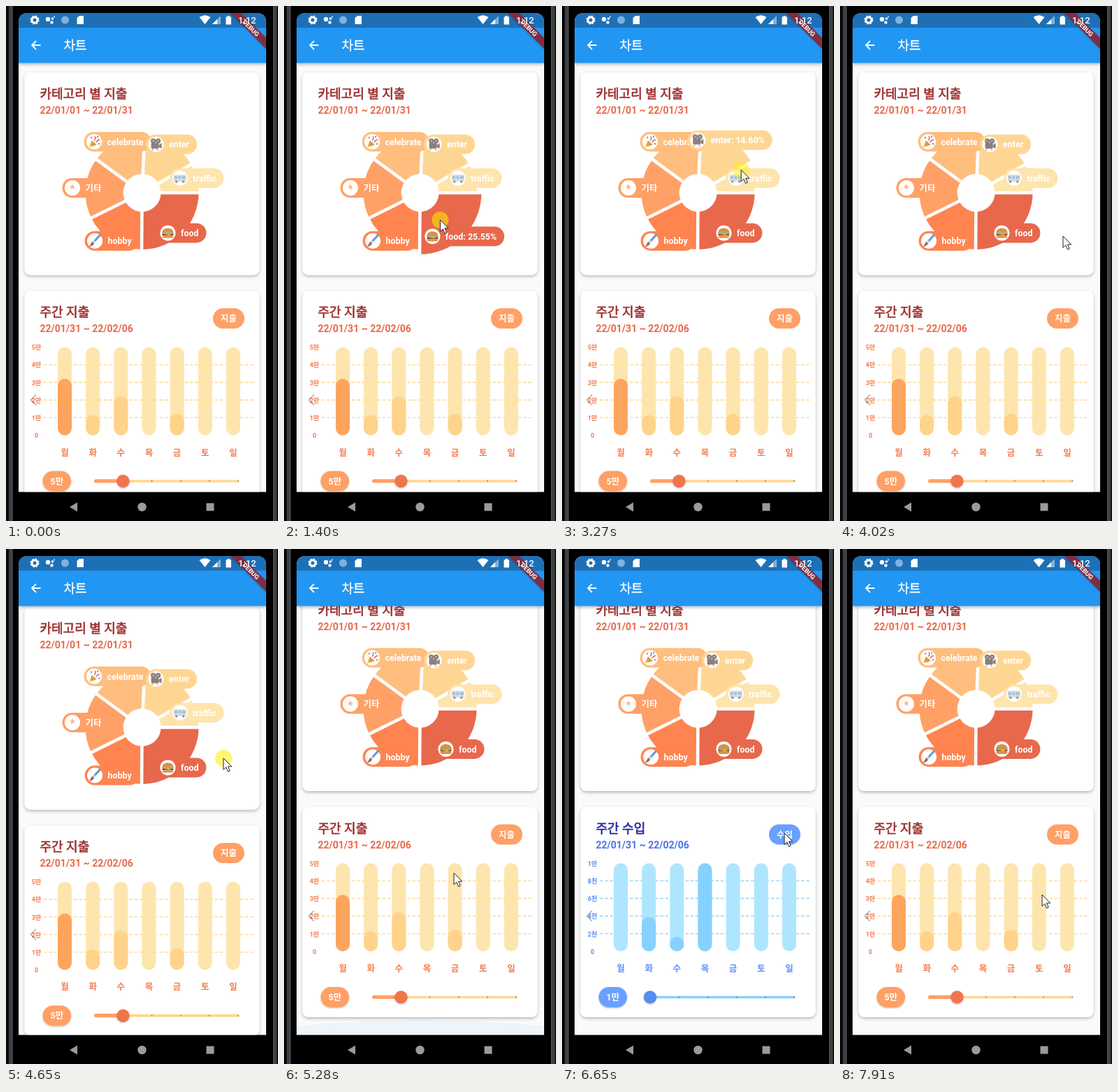
These frames come from a looping animation (389x736 px, 8 s). An HTML page:

```html
<!DOCTYPE html>
<html lang="ko">
<head>
<meta charset="utf-8">
<style>
  html, body { margin: 0; width: 100%; height: 100%; overflow: hidden; background: #000; }
  svg { display: block; width: 389px; height: 736px; }
  text { font-family: Roboto, "Noto Sans CJK KR", "Noto Sans CJK JP", sans-serif; }
  .bold { font-weight: 700; }
  .title { font-size: 18px; fill: currentColor; stroke: currentColor; stroke-width: .7px; }
  .date { font-size: 14px; font-weight: 700; }
  .label { font-size: 12.4px; font-weight: 700; fill: #fff; }
  .axis { font-size: 9px; font-weight: 700; }
  .day { font-size: 12.5px; font-weight: 700; }
  .mid { text-anchor: middle; }
</style>
</head>
<body>
<svg id="stage" viewBox="0 0 389 736" xmlns="http://www.w3.org/2000/svg"></svg>
<script>
const LOOP = 8000;
const CX = 194.6, CY = 267, RADIUS = 81, GROW = 7;
const BAR_TOP = 487.5, BAR_H = 126, BAR_X = 84, BAR_STEP = 40.15;

const slices = [
  { name: 'food', share: '25.55%', from: 0, to: 90.4, color: '#e8684c', icon: 'burger' },
  { name: 'hobby', share: '17.52%', from: 90.4, to: 153.7, color: '#ff8450', icon: 'brush' },
  { name: '기타', share: '18.25%', from: 153.7, to: 216.2, color: '#ffa067', icon: 'star' },
  { name: 'celebrate', share: '15.33%', from: 216.2, to: 272.5, color: '#ffbe7d', icon: 'party' },
  { name: 'enter', share: '14.60%', from: 272.5, to: 330, color: '#fed694', icon: 'camera' },
  { name: 'traffic', share: '8.76%', from: 330, to: 360, color: '#fee4ad', icon: 'bus' },
];

const themes = {
  expense: {
    word: '지출', title: '#9e2f2f', date: '#e8694b', axis: '#f47b4c', pill: '#ffa066',
    grid: '#ffdc9c', track: '#ffd88e', thumb: '#f0744c', thumbX: 167.4, limit: '5만',
    ticks: ['5만', '4만', '3만', '2만', '1만', '0'],
    back: [253, 229, 173], fills: [[255, 164, 92], [255, 211, 138]],
    values: [.64, .23, .445, 0, .245, 0, 0],
  },
  income: {
    word: '수입', title: '#2a2a9e', date: '#4a75e8', axis: '#5c8df6', pill: '#69a0ff',
    grid: '#9fd8f5', track: '#87d2ff', thumb: '#538df0', thumbX: 126, limit: '1만',
    ticks: ['1만', '8천', '6천', '4천', '2천', '0'],
    back: [174, 230, 255], fills: [[134, 209, 255], [134, 209, 255]],
    values: [0, .39, .165, 1, 0, 0, 0],
  },
};

// Timeline
const touches = [[1255, 0], [1700, 1], [2130, 2], [2560, 3], [3010, 4], [3330, -1]];
const toIncome = 6270, toExpense = 7520, barTime = 380;
const cursorKeys = [
  [510, 374, 722], [640, 352, 610], [760, 300, 440], [1010, 230, 298], [1280, 230, 298],
  [1500, 218, 312], [1750, 175, 316], [2000, 150, 295], [2260, 146, 266], [2400, 146, 262],
  [2650, 165, 224], [2900, 190, 216], [3020, 208, 215], [3270, 256, 234], [3650, 322, 330],
  [3900, 322, 330], [4300, 312, 326], [4520, 311, 312], [4650, 311, 299], [5030, 309, 262],
  [5280, 243, 463], [5560, 243, 463], [5950, 318, 406], [7560, 318, 406], [7900, 289, 494],
];
const scrollKeys = [[4300, 0], [4520, 4], [4650, 12], [4900, 33], [5030, 38.5]];
const glowKeys = [[4950, 0], [5120, 1], [5280, .9], [5530, 0]];
const pressKeys = [
  [1230, 0], [1255, 1], [3200, 1], [3270, .8], [3450, 0], [4280, 0], [4300, 1], [5030, 1],
  [5150, 0], [6180, 0], [6200, 1], [6280, 1], [6420, 0], [7490, 0], [7510, 1], [7560, 1], [7680, 0],
];

const clamp = v => Math.max(0, Math.min(1, v));
const mix = (a, b, p) => a + (b - a) * p;
const rgb = (a, b, p) => `rgb(${a.map((v, i) => Math.round(mix(v, b[i], p)))})`;
const polar = (r, deg) => {
  const a = deg * Math.PI / 180;
  return [CX + r * Math.cos(a), CY + r * Math.sin(a)];
};

function track(keys, t) {
  const next = keys.findIndex(k => k[0] > t);
  if (next === 0) return keys[0].slice(1);
  if (next < 0) return keys[keys.length - 1].slice(1);
  const a = keys[next - 1], b = keys[next];
  const p = (t - a[0]) / (b[0] - a[0]);
  return a.slice(1).map((v, i) => mix(v, b[i + 1], p));
}

const icons = {
  burger: `<path d="M-8-1C-8-9 8-9 8-1Z" fill="#d98f4a"/><rect x="-8.5" y="-1" width="17" height="2" rx="1" fill="#9aa85a"/>
    <rect x="-8" y="1" width="16" height="2.6" rx="1" fill="#8a4a3a"/><path d="M-7 1L6 1L2 3Z" fill="#f6c343"/>
    <path d="M-8 4H8Q8 7 5 7H-5Q-8 7-8 4Z" fill="#d98f4a"/>`,
  brush: `<path d="M7-8L-2 2" stroke="#5f9bd0" stroke-width="3" stroke-linecap="round"/>
    <path d="M0 0L-3 3" stroke="#d2d6d9" stroke-width="4"/><path d="M-4 1L-1 4Q-4 8-8 8Q-6 5-4 1Z" fill="#94695a"/>`,
  star: `<text class="mid" y="7" font-size="17" fill="#ffa067">*</text>`,
  party: `<path d="M-7 8L-3-2L4 4Z" fill="#f0b43c"/><path d="M-5 3L0 6M-4 0L2 5" stroke="#c66d3b"/>
    <path d="M0-2Q3-4 1-8M3 1Q5-3 8-3" fill="none" stroke="#d85b64" stroke-width="1.4"/>
    <g fill="#58a5d8"><circle cx="-4" cy="-6" r="1.2"/><circle cx="5" cy="-7" r="1.2"/><circle cx="7" cy="3" r="1.2"/></g>`,
  camera: `<g fill="#8c7e7a"><circle cx="-4" cy="-5" r="3.6"/><circle cx="3" cy="-5" r="3.6"/>
    <rect x="-7" y="-2" width="11" height="8" rx="1"/><path d="M4 1L8-2V6L4 4Z"/></g>
    <g fill="#b8aaa5"><circle cx="-4" cy="-5" r="1.4"/><circle cx="3" cy="-5" r="1.4"/></g><path d="M-4 6L-6 9M1 6L3 9" stroke="#8c7e7a"/>`,
  bus: `<rect x="-9" y="-5" width="18" height="10" rx="2" fill="#d9dee1"/><rect x="-8" y="-3" width="16" height="4" fill="#a6c3d3"/>
    <path d="M-3-3V1M2-3V1" stroke="#eef1f2"/><g fill="#8c9296"><circle cx="-5" cy="5" r="1.7"/><circle cx="5" cy="5" r="1.7"/></g>`,
};

const text = (x, y, s, attrs = '') => `<text x="${x}" y="${y}" ${attrs}>${s}</text>`;
const repeat = (n, fn) => Array.from({ length: n }, (_, i) => fn(i)).join('');
const card = (y, h) => `<rect x="26.5" y="${y}" width="336" height="${h}" rx="8.5" fill="#fff" filter="url(#shadow)"/>`;

const pieMarkup = `
  ${slices.map((s, i) => `<path id="slice${i}" fill="${s.color}"/>`).join('')}
  ${slices.map(s => {
    const [x, y] = polar(93, s.from);
    return `<path d="M${CX} ${CY}L${x} ${y}" stroke="#fff" stroke-width="4.6"/>`;
  }).join('')}
  <circle cx="${CX}" cy="${CY}" r="27" fill="#fff"/>
  ${slices.map((s, i) => `<g id="badge${i}"><rect y="-14" height="28" rx="14" fill="${s.color}"/>
    <circle cx="14.5" r="11" fill="#fff"/><g transform="translate(14.5)">${icons[s.icon]}</g>
    <text class="label" x="33" y="4.6"></text></g>`).join('')}`;

const days = ['월', '화', '수', '목', '금', '토', '일'];

const weekMarkup = `
  ${text(48.5, 444, '', 'id="weekTitle" class="title"')}
  ${text(48.5, 466, '22/01/31 ~ 22/02/06', 'class="date" data-fill="date"')}
  <rect x="296" y="432" width="45" height="29" rx="14.5" data-fill="pill"/>
  ${text(318.5, 451, '', 'id="toggle" class="label mid"')}
  ${repeat(6, i => text(43.5, 491.2 + i * 25.2, '', `id="tick${i}" class="axis mid" data-fill="axis"`))}
  <path id="grid" d="${repeat(4, i => `M54 ${BAR_TOP + (i + 1) * BAR_H / 5}H355`)}" stroke-width="1.6" stroke-dasharray="4.5 2.7"/>
  ${days.map((d, i) => {
    const x = BAR_X + i * BAR_STEP;
    return `<rect id="back${i}" x="${x - 10}" y="${BAR_TOP}" width="20" height="${BAR_H}" rx="10"/>
      <rect id="bar${i}" x="${x - 10}" width="20"/>
      ${text(x, 642.5, d, 'class="day mid" data-fill="axis"')}`;
  }).join('')}
  <path d="M43 555.5L35.5 563L43 570.5" fill="none" stroke="#000" stroke-opacity=".25" stroke-width="2"/>
  <rect x="52.5" y="664.5" width="40.5" height="29" rx="14.5" data-fill="pill" filter="url(#lift)"/>
  ${text(72.8, 683.5, '', 'id="limit" class="label mid"')}
  <rect x="126" y="677.2" width="207.5" height="3.6" rx="1.8" data-fill="track"/>
  <rect id="active" x="126" y="676.2" height="5.4" rx="2.7" data-fill="pill"/>
  ${repeat(5, i => `<circle cx="${167.4 + i * 41.2}" cy="679" r=".9" fill="#9b6a45"/>`)}
  <circle id="thumb" cy="679" r="9.2" data-fill="thumb" filter="url(#lift)"/>`;

const statusMarkup = `
  <g fill="#fff">
    <circle cx="41" cy="20" r="4" fill="none" stroke="#fff" stroke-width="3"/>
    <circle cx="41" cy="20" r="5.7" fill="none" stroke="#fff" stroke-width="1.6" stroke-dasharray="2.4 2.1"/>
    <circle cx="60" cy="19" r="3.2"/><circle cx="66.5" cy="18" r="1.8"/><circle cx="65.5" cy="23.5" r="2.2"/><circle cx="69" cy="15.5" r="1"/>
    <circle cx="84.5" cy="20" r="5.5" fill="#7fb2de"/><path d="M80 17a5 5 0 0 0 7 7a5 5 0 0 1-7-7" fill="#e4f1fb"/>
    <path d="M105 14h6v12h-9.500v-9z"/>
    <path d="M276.500 16Q284.500 10.500 292.500 16L284.500 26Z"/>
    <path d="M307 14V26H295Z" opacity=".45"/><path d="M302 19V26H295Z"/>
    <path d="M314.500 15.500h2v-1.500h3.500v1.500h2V26.500h-7.500z"/>
  </g>`;

const stage = document.getElementById('stage');
stage.innerHTML = `
  <defs>
    <filter id="shadow" x="-10%" y="-10%" width="120%" height="120%"><feDropShadow dx="0" dy="2" stdDeviation="2.2" flood-opacity=".28"/></filter>
    <filter id="lift" x="-30%" y="-30%" width="160%" height="160%"><feDropShadow dx="0" dy="1" stdDeviation="1" flood-opacity=".28"/></filter>
    <clipPath id="screen"><path d="M18 694.500V24Q18 10 32 10H358Q372 10 372 24V694.500Z"/></clipPath>
    <clipPath id="body"><rect x="18" y="81" width="354" height="613.5"/></clipPath>
  </defs>
  <rect width="389" height="736" fill="#08080a"/>
  <path d="M6.500 0V736M385 0V736" stroke="#3c3e43" stroke-width="5"/>
  <path d="M9 0V736M382.500 0V736" stroke="#5c5e64"/>
  <rect x="10" width="372" height="736" fill="#000"/>
  <g clip-path="url(#screen)">
    <rect x="18" y="10" width="354" height="685" fill="#fafafa"/>
    <g clip-path="url(#body)">
      <g id="page">
        ${card(95, 289.5)}
        ${text(48.5, 132, '카테고리 별 지출', 'class="title" color="#9e2f2f"')}
        ${text(48.5, 154, '22/01/01 ~ 22/01/31', 'class="date" fill="#e8694b"')}
        ${pieMarkup}
        ${card(407, 300.5)}
        ${weekMarkup}
      </g>
      <path id="glow" d="M18 695V682Q195 664 372 682V695Z" fill="#2196f3" fill-opacity=".06"/>
    </g>
    <rect x="18" y="10" width="354" height="71.500" fill="#2196f3" filter="url(#shadow)"/>
    <rect x="18" y="10" width="354" height="21" fill="#1d70b6"/>
    <path d="M49.500 56H37M43 50L37 56L43 62" fill="none" stroke="#fff" stroke-width="1.800"/>
    ${text(82.5, 62.5, '차트', 'font-size="18" fill="#fff" stroke="#fff" stroke-width=".3"')}
    <path d="M321 10H336.400L372 45.600V61Z" fill="#7f2f42" filter="url(#lift)"/>
    <text class="bold mid" font-size="9.2" fill="#fff" transform="translate(350.4 31.6) rotate(45)" y="3.2">DEBUG</text>
    ${statusMarkup}
    ${text(332, 24.8, '1:12', 'font-size="13" font-weight="500" fill="#fff"')}
  </g>
  <g fill="#9b9b9b"><path d="M91 716L102 709.500V722.500Z"/><circle cx="194.500" cy="716" r="6.200"/><rect x="286.500" y="710.500" width="11" height="11"/></g>
  <g id="cursor">
    <circle id="press" r="12" fill="#fff000" fill-opacity=".55"/>
    <path d="M0 0V16.500L3.800 13L6.500 19.300L9.200 18.100L6.500 12H11.700Z" fill="#fff" stroke="#222" stroke-width="1"/>
  </g>`;

const el = id => document.getElementById(id);
const set = (node, attrs) => { for (const k in attrs) node.setAttribute(k, attrs[k]); };
const write = (node, s) => { if (node.textContent !== s) node.textContent = s; };

function drawPie(t) {
  slices.forEach((s, i) => {
    const n = touches.findIndex(touch => touch[1] === i);
    let grown = 0, selected = false;
    if (n >= 0) {
      const start = touches[n][0], end = touches[n + 1][0];
      grown = clamp((t - start) / 150) - clamp((t - end) / 150);
      selected = t >= start && t < end;
    }
    const r = RADIUS + GROW * grown;
    set(el('slice' + i), { d: `M${CX} ${CY}L${polar(r, s.from)}A${r} ${r} 0 0 1 ${polar(r, s.to)}Z` });

    const badge = el('badge' + i), label = badge.querySelector('.label');
    write(label, selected ? `${s.name}: ${s.share}` : s.name);
    const width = 44 + label.getComputedTextLength();
    const [x, y] = polar(r, (s.from + s.to) / 2);
    set(badge.firstElementChild, { width });
    set(badge, { transform: `translate(${x - width / 2} ${y})` });
  });
}

function drawWeek(t) {
  const theme = t >= toIncome && t < toExpense ? themes.income : themes.expense;
  const p = clamp((t - toIncome) / barTime) - clamp((t - toExpense) / barTime);
  const { expense, income } = themes;

  stage.querySelectorAll('[data-fill]').forEach(n => set(n, { fill: theme[n.dataset.fill] }));
  set(el('weekTitle'), { color: theme.title });
  write(el('weekTitle'), '주간 ' + theme.word);
  write(el('toggle'), theme.word);
  write(el('limit'), theme.limit);
  theme.ticks.forEach((s, i) => write(el('tick' + i), s));
  set(el('grid'), { stroke: theme.grid });
  set(el('thumb'), { cx: theme.thumbX });
  set(el('active'), { width: theme.thumbX - 126 });

  days.forEach((_, i) => {
    const kind = i ? 1 : 0;
    const h = BAR_H * mix(expense.values[i], income.values[i], p);
    set(el('back' + i), { fill: rgb(expense.back, income.back, p) });
    set(el('bar' + i), {
      y: BAR_TOP + BAR_H - h, height: h, rx: Math.min(10, h / 2),
      fill: rgb(expense.fills[kind], income.fills[kind], p),
    });
  });
}

function draw(t) {
  drawPie(t);
  drawWeek(t);
  set(el('page'), { transform: `translate(0 ${-track(scrollKeys, t)[0]})` });
  set(el('glow'), { opacity: track(glowKeys, t)[0] });
  set(el('press'), { opacity: track(pressKeys, t)[0] });
  const [x, y] = track(cursorKeys, t);
  set(el('cursor'), { transform: `translate(${x} ${y})`, visibility: t < 510 ? 'hidden' : 'visible' });
}

const begin = performance.now();
function tick() {
  draw((performance.now() - begin) % LOOP);
  requestAnimationFrame(tick);
}
tick();
</script>
</body>
</html>
```
